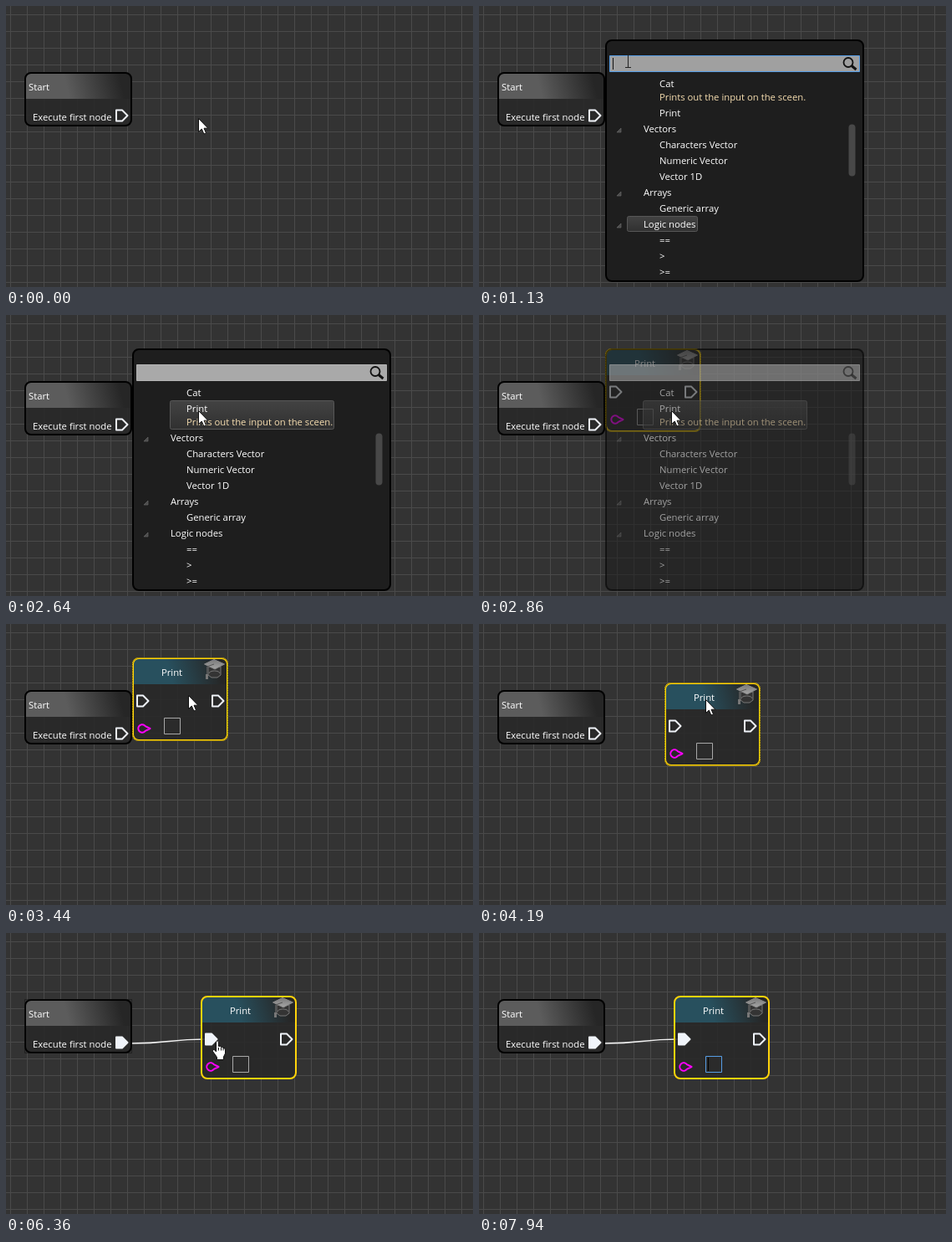
An HTML page with a canvas that plays this animation: 559 by 336 pixels, repeating every 8000 ms.

```html
<!DOCTYPE html>
<html lang="en">
<head>
<meta charset="utf-8">
<title>Node editor</title>
<style>
html, body { margin: 0; width: 100%; height: 100%; overflow: hidden; background: #333; }
canvas { display: block; }
</style>
</head>
<body>
<canvas id="stage" width="559" height="336"></canvas>
<script>
const ctx = document.getElementById('stage').getContext('2d');
const LOOP = 8000;
const FONT = '"Open Sans", "Noto Sans", sans-serif';
const PIN = '#f0f4fa', BLUE = '#569de5';

// Pointer moves: start, end, number of steps, destination x, y
const moves = [
  [60, 210, 3, 174, 62],
  [440, 440, 1, 177, 65],
  [1130, 1130, 1, 178, 66],
  [1820, 2400, 9, 230, 114],
  [3440, 3580, 3, 205, 55],
  [3750, 3750, 1, 200, 60],
  [3900, 4265, 6, 282, 95],
  [4338, 4630, 5, 148, 111],
  [4710, 4940, 4, 138, 128],
  [5470, 5470, 1, 221, 129],
  [5528, 5760, 5, 335, 127],
  [5910, 6130, 4, 252, 128],
  [6760, 7190, 7, 282, 153]
];
const START = { x: 22, y: 79, w: 129, h: 65 };

const within = (t, a, b) => t >= a && t < b;

function stepped(t, from, to, count) {
  if (t < from) return 0;
  if (t >= to) return 1;
  const k = Math.floor((t - from) / (to - from) * (count - 1)) + 1;
  return Math.sin(k / count * Math.PI / 2);
}

function pointer(t) {
  let x = 230, y = 134;
  for (const [from, to, count, nx, ny] of moves) {
    const p = stepped(t, from, to, count);
    x += (nx - x) * p;
    y += (ny - y) * p;
  }
  return { x: Math.round(x), y: Math.round(y) };
}

function fillRect(x, y, w, h, color) {
  ctx.fillStyle = color;
  ctx.fillRect(x, y, w, h);
}

function box(x, y, w, h, r, fill, stroke, width = 1) {
  const i = width / 2;
  ctx.beginPath();
  ctx.roundRect(x + i, y + i, w - width, h - width, r);
  if (fill) { ctx.fillStyle = fill; ctx.fill(); }
  if (stroke) { ctx.strokeStyle = stroke; ctx.lineWidth = width; ctx.stroke(); }
}

function poly(points, fill, stroke, width = 1) {
  ctx.beginPath();
  points.forEach(([x, y]) => ctx.lineTo(x, y));
  ctx.closePath();
  if (fill) { ctx.fillStyle = fill; ctx.fill(); }
  if (stroke) { ctx.strokeStyle = stroke; ctx.lineWidth = width; ctx.stroke(); }
}

function label(text, x, y, color = '#fff', align = 'left') {
  ctx.font = '11.3px ' + FONT;
  ctx.textAlign = align;
  ctx.fillStyle = color;
  ctx.fillText(text, x, y);
}

function grid() {
  fillRect(0, 0, 559, 336, '#333');
  for (let x = 5; x < 559; x += 20) fillRect(x, 0, 1, 336, '#4a4a4a');
  for (let y = 10; y < 336; y += 20) fillRect(0, y, 559, 1, '#4a4a4a');
}

function execPin(x, cy, filled, width = 2) {
  ctx.lineJoin = 'round';
  poly([[x + 1, cy - 6.5], [x + 8, cy - 6.5], [x + 14.5, cy], [x + 8, cy + 6.5], [x + 1, cy + 6.5]],
    filled ? PIN : null, PIN, width);
}

function dataPin(x, cy) {
  ctx.beginPath();
  ctx.arc(x + 6, cy, 4.7, 0.65, -0.65);
  ctx.lineTo(x + 15.5, cy);
  ctx.closePath();
  ctx.strokeStyle = '#f0f';
  ctx.lineWidth = 2;
  ctx.stroke();
}

function hat(x, y) {
  ctx.save();
  ctx.translate(x, y);
  poly([[5, 9], [5, 19], [9, 22], [16, 22], [20, 19], [20, 9]], '#343434', '#777');
  ctx.beginPath();
  ctx.ellipse(12.5, 17, 6.5, 3, 0, Math.PI, 0);
  ctx.stroke();
  const shade = ctx.createLinearGradient(0, 0, 0, 13);
  shade.addColorStop(0, '#777');
  shade.addColorStop(1, '#aaa');
  poly([[0.5, 6], [12, 0.5], [24.5, 6], [13, 12]], shade, '#888');
  ctx.beginPath();
  ctx.moveTo(12, 6);
  ctx.lineTo(3.5, 9);
  ctx.lineTo(3.5, 19);
  ctx.strokeStyle = '#555';
  ctx.stroke();
  fillRect(2, 18, 3, 6, '#777');
  ctx.restore();
}

function focusDots(x, y, w, h, color) {
  ctx.save();
  ctx.setLineDash([1, 1]);
  ctx.lineWidth = 1;
  ctx.strokeStyle = color;
  ctx.strokeRect(x + 0.5, y + 0.5, w - 1, h - 1);
  ctx.restore();
}

function panel(x, y, w, h, tint, border) {
  box(x, y, w, h, 7, 'rgba(40,40,40,.88)');
  ctx.save();
  ctx.beginPath();
  ctx.roundRect(x + 1, y + 1, w - 2, h - 2, 7);
  ctx.clip();
  const shade = ctx.createLinearGradient(x, y + 32, x + w * 0.88, y + 4);
  shade.addColorStop(0, tint);
  shade.addColorStop(0.45, tint);
  shade.addColorStop(1, '#262626');
  fillRect(x, y, w, 32, shade);
  ctx.restore();
  box(x, y, w, h, 7, null, border, 2);
}

function startNode(t) {
  const { x, y, w, h } = START;
  panel(x, y, w, h, '#5c5c5c', '#000');
  label('Start', x + 5, y + 22);
  label('Execute first node', x + 10, y + 58);
  execPin(x + 109, y + 52, t >= 6360, within(t, 4780, 5760) ? 3 : 2);
  if (within(t, 4630, 5528)) hat(x + 100, y + 1);
  if (within(t, 5470, 7570)) focusDots(x, y, w, h, '#111');
}

function printNode(t) {
  const p = stepped(t, 3900, 4265, 6);
  const x = Math.round(151 + 82 * p), y = Math.round(40 + 35 * p);
  panel(x, y, 115, 100, '#28505e', '#ffd40a');
  label('Print', x + 47.5, y + 22, '#fff', 'center');
  execPin(x + 5, y + 52, t >= 6360);
  execPin(x + 95, y + 52, false);
  dataPin(x + 6, y + 85);
  box(x + 38, y + 72, 20, 20, 0, '#2b2b2b', t >= 7115 ? BLUE : '#a8a8a8');
  if (t >= 7570) fillRect(x + 41, y + 74, 1, 16, '#000');
  if (within(t, 2780, 4484) || t >= 6360) hat(x + 86, y + 2);
  if (t < 5470) {
    ctx.save();
    ctx.setLineDash([1, 1]);
    box(x, y, 115, 100, 8, null, '#4a4010');
    ctx.restore();
  }
}

function wire(t, mouse) {
  if (t < 5470) return;
  let ex = mouse.x, ey = mouse.y;
  if (t < 5528) { ex = 162; ey = 132; }
  if (t >= 6130) { ex = 239; ey = 127; }
  const mid = (151 + ex) / 2;
  ctx.beginPath();
  ctx.moveTo(151, 132);
  ctx.bezierCurveTo(mid, 132, mid, ey, ex, ey);
  ctx.strokeStyle = t < 5528 ? '#ccc' : '#f2f2f2';
  ctx.lineWidth = t < 5528 ? 2 : 1.7;
  ctx.stroke();
}

function highlight(x, y, w, h) {
  const shade = ctx.createLinearGradient(0, y, 0, y + h);
  shade.addColorStop(0, '#434343');
  shade.addColorStop(1, '#303030');
  box(x, y, w, h, 2, shade, '#575757');
}

function searchBox(t) {
  const focused = t < 2640;
  box(156, 59, 300, 20, 0, focused ? '#a0a0a0' : '#a9a9a9', focused ? BLUE : '#b4b4b4');
  if (t < 1280 || within(t, 1820, 2350)) fillRect(160, 62, 1, 14, '#111');
  ctx.beginPath();
  ctx.arc(442, 67.5, 5.5, 0, Math.PI * 2);
  ctx.strokeStyle = '#111';
  ctx.lineWidth = 1.8;
  ctx.stroke();
  ctx.beginPath();
  ctx.moveTo(446, 71.5);
  ctx.lineTo(451.5, 76);
  ctx.lineWidth = 3;
  ctx.stroke();
}

function menu(t) {
  const opening = t < 1280, hover = t >= 2640;
  const hint = 'Prints out the input on the sceen.';
  box(151, 40, 310, 290, 7, '#1e1e1e', '#000', 2);
  searchBox(t);
  ctx.save();
  ctx.beginPath();
  ctx.rect(153, 82, 306, 244);
  ctx.clip();
  label('Cat', 216, 97);
  if (opening) {
    highlight(177, 251, 85, 19);
    label(hint, 216, 113, '#f7deb0');
  }
  if (hover) {
    highlight(196, 102, 197, 35);
    label(hint, 216, 132, '#f7deb0');
  }
  label('Print', 216, opening ? 132 : 116);
  const groups = ['Vectors', 'Arrays', 'Logic nodes'];
  const rows = ['Vectors', 'Characters Vector', 'Numeric Vector', 'Vector 1D', 'Arrays',
    'Generic array', 'Logic nodes', '==', '>', '>=', '<'];
  const top = opening || hover ? 151 : 135;
  rows.forEach((text, i) => {
    const y = top + i * 19;
    const group = groups.includes(text);
    label(text, group ? 197 : 216, y);
    if (group) poly([[170, y - 5], [170, y], [165, y]], '#4c4c4c', '#666', 0.7);
  });
  ctx.restore();
  box(442, 141, 9, 63, 4, '#484848');
}

function arrow(x, y) {
  ctx.lineJoin = 'miter';
  poly([[0, 0], [0, 16], [3.8, 12.6], [6.4, 18.5], [9, 17.4], [6.5, 11.7], [11.3, 11.7]]
    .map(([a, b]) => [x + a + 0.5, y + b + 0.5]), '#fff', '#111');
}

function iBeam(x, y, color) {
  fillRect(x, y - 7, 1, 15, color);
  for (const dy of [-8, 7]) {
    fillRect(x - 3, y + dy, 3, 1, color);
    fillRect(x + 1, y + dy, 3, 1, color);
  }
}

function hand(x, y) {
  ctx.save();
  ctx.translate(x - 5, y);
  ctx.beginPath();
  ctx.moveTo(4.5, 14);
  ctx.lineTo(4.5, 2);
  ctx.quadraticCurveTo(6, -0.5, 7.5, 2);
  ctx.lineTo(7.5, 7.5);
  ctx.quadraticCurveTo(9.5, 6.5, 10.5, 8.5);
  ctx.quadraticCurveTo(12.5, 7.5, 13, 9.5);
  ctx.quadraticCurveTo(15.5, 9, 15.5, 12);
  ctx.lineTo(15.5, 16);
  ctx.lineTo(13.5, 20);
  ctx.lineTo(13.5, 23.5);
  ctx.lineTo(5.5, 23.5);
  ctx.lineTo(5.5, 20.5);
  ctx.lineTo(0.5, 13.5);
  ctx.quadraticCurveTo(0.5, 10.5, 3, 12);
  ctx.closePath();
  ctx.fillStyle = '#fff';
  ctx.fill();
  ctx.strokeStyle = '#111';
  ctx.lineWidth = 1;
  ctx.stroke();
  ctx.beginPath();
  for (const fx of [7.5, 10.5, 13]) {
    ctx.moveTo(fx, 9);
    ctx.lineTo(fx, 12.5);
  }
  ctx.stroke();
  ctx.restore();
}

function cursor(t, { x, y }) {
  if (t >= 7940) return;
  if (within(t, 1130, 2640) && y < 79) iBeam(x, y, '#222');
  else if (t >= 7115) iBeam(x, y, '#ddd');
  else if (within(t, 4780, 5470) || within(t, 6055, 6832)) hand(x, y);
  else arrow(x, y);
}

function draw(t) {
  const mouse = pointer(t);
  grid();
  wire(t, mouse);
  startNode(t);
  if (t >= 2780) printNode(t);
  if (within(t, 1130, 3220)) {
    ctx.save();
    ctx.globalAlpha = 1 - stepped(t, 2780, 3220, 7);
    menu(t);
    ctx.restore();
  }
  cursor(t, mouse);
}

const begin = performance.now();
function tick() {
  draw((performance.now() - begin) % LOOP);
  requestAnimationFrame(tick);
}
tick();
</script>
</body>
</html>
```
